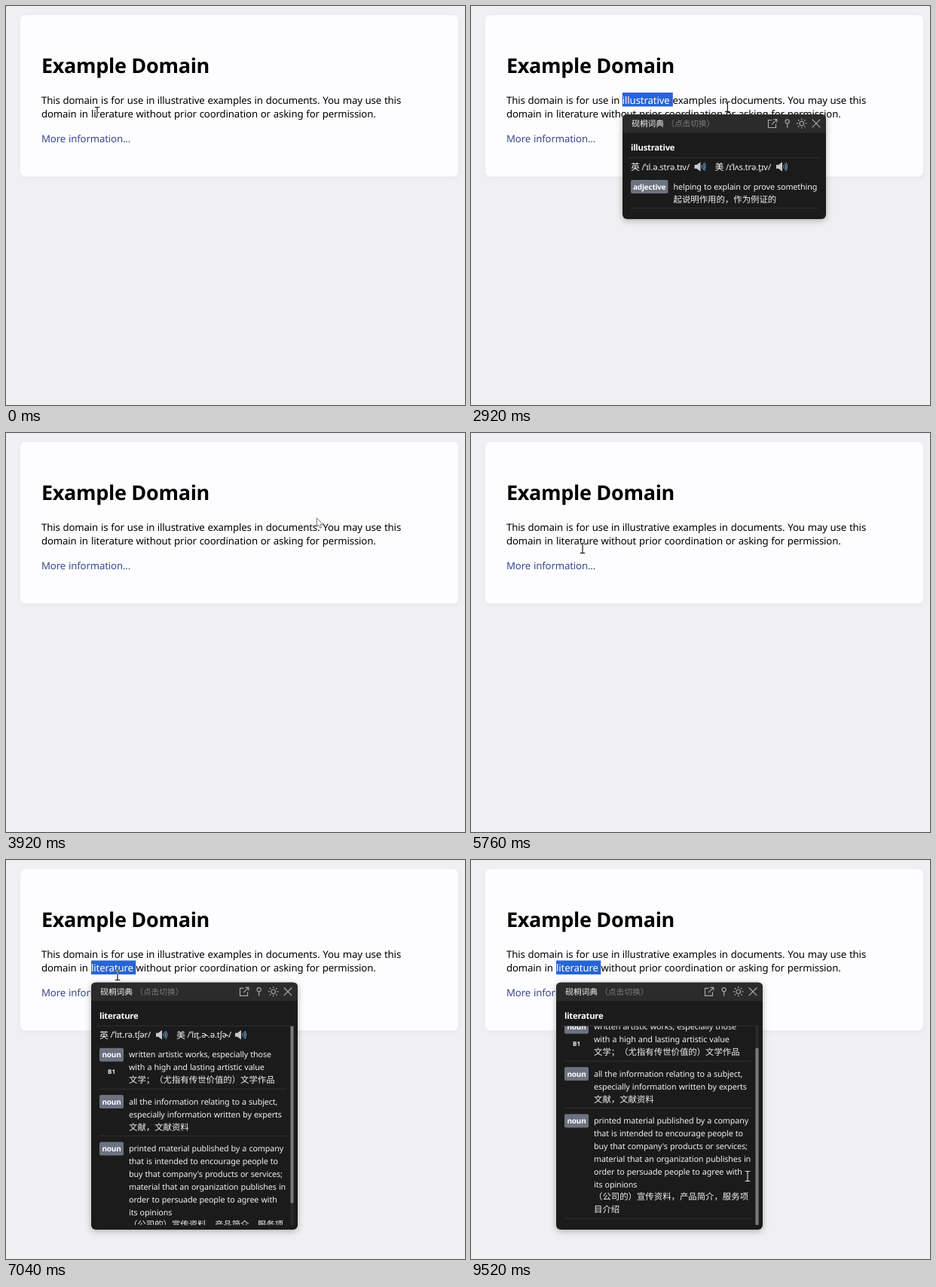
Animation, 609 px wide and 530 px high, one loop 9.56 s. Source, as an HTML page:

```html
<!DOCTYPE html>
<html lang="zh-CN">
<head>
<meta charset="utf-8">
<title>Dictionary popup</title>
<style>
  html, body { margin: 0; width: 100%; height: 100%; overflow: hidden; background: #f0f0f2; }
  svg { display: block; width: 100vw; height: 100vh; }
  text {
    font-family: "Noto Sans", "Noto Sans CJK SC", "Noto Sans CJK", sans-serif;
    text-rendering: geometricPrecision;
    text-spacing-trim: space-all;
    white-space: pre;
  }
  .page text { font-size: 13.2px; letter-spacing: -.01em; word-spacing: .042em; }
  .page .h1 { font-size: 27px; font-weight: 700; letter-spacing: -.0115em; word-spacing: 0; }
  .card { filter: drop-shadow(1px 2px 3px rgba(0, 0, 0, .035)); }
  .popup { filter: drop-shadow(0 2px 4px rgba(0, 0, 0, .28)); }
  .popup text { fill: #f2f2f2; }
  .popup .bar { font-size: 10.7px; font-kerning: none; }
  .popup .dim { fill: #7c7c7c; }
  .popup .word { font-size: 11.3px; font-weight: 700; letter-spacing: -.024em; fill: #fff; }
  .popup .han { font-size: 12px; }
  .popup .ipa { font-size: 11.3px; letter-spacing: -.015em; }
  .popup .en { font-size: 10.77px; letter-spacing: -.0114em; word-spacing: .042em; }
  .popup .zh { font-size: 11.4px; font-weight: 500; font-kerning: none; }
  .popup .tag { font-size: 10px; font-weight: 700; letter-spacing: -.02em; text-anchor: middle; fill: #fff; }
  .popup .level { font-size: 8px; font-weight: 700; text-anchor: middle; }
  .icon { fill: none; stroke: #a8a8a8; stroke-width: 1.2; }
  #beam { fill: none; stroke: #fff; stroke-width: 1.1; mix-blend-mode: difference; }
</style>
</head>
<body>
<svg id="stage" viewBox="0 0 609 530" xmlns="http://www.w3.org/2000/svg">
  <rect width="609" height="530" fill="#f0f0f2"/>
  <rect class="card" x="19" y="12" width="581" height="214.5" rx="7" fill="#fdfdff"/>
  <g class="page">
    <text class="h1" x="47" y="89">Example Domain</text>
    <rect id="mark1" x="200.8" y="115" width="67" height="18.5" fill="#2964d4"/>
    <rect id="mark2" x="113" y="133.5" width="59.3" height="18.5" fill="#2964d4"/>
    <text x="47" y="130">This domain is for use in</text>
    <text id="word1" x="200.8" y="130">illustrative</text>
    <text x="267.6" y="130">examples in documents. You may use this</text>
    <text x="47" y="148.3">domain in</text>
    <text id="word2" x="113" y="148.3">literature</text>
    <text x="172.6" y="148.3">without prior coordination or asking for permission.</text>
    <text x="47" y="181" fill="#38488f">More information...</text>
  </g>
  <g id="popups"></g>
  <path id="beam" d="M-3.3-6.5H-1Q0-6.5 0-5.5Q0-6.5 1-6.5H3.3M0-6V6M-3.3 6.5H-1Q0 6.5 0 5.5Q0 6.5 1 6.5H3.3"/>
  <path id="arrow" d="M0 0V11.8L2.7 9.3L4.5 13.4L6.4 12.6L4.6 8.5H8.3Z" fill="#fff" stroke="#555" stroke-width=".8"/>
</svg>
<script>
const LOOP = 9560, LINE = 16.9, SCROLL = 37;
const VIEW = { top: 58, height: 264 };
const THUMB = 235;
const $ = id => document.getElementById(id);

const text = (cls, x, y, s) => `<text class="${cls}" x="${x}" y="${y}">${s}</text>`;
const rule = (y, x1, x2) => `<path d="M${x1} ${y}H${x2}" stroke="#303030"/>`;
const isHan = s => /[\u4e00-\u9fff]/.test(s);

const speaker = (x, y) => `<g transform="translate(${x} ${y})">
  <path d="M-7-2.5H-4L1-6.2V6.2L-4 2.5H-7Z" fill="#c9c9d0"/>
  <path d="M2.6-2.2Q4 0 2.6 2.2M4.3-4Q6.8 0 4.3 4M6-5.4Q9 0 6 5.4" fill="none" stroke="#6f9fc8" stroke-width="1.1"/></g>`;

function toolbar(w) {
  let rays = "";
  for (let i = 0; i < 8; i++) rays += `<path d="M0-4.7V-6.8" transform="rotate(${i * 45})"/>`;
  const at = (right, body) => `<g transform="translate(${w - right} 12)">${body}</g>`;
  return `<path d="M0 24.5V6Q0 0 6 0H${w - 6}Q${w} 0 ${w} 6V24.5Z" fill="#2b2b2b"/>` +
    text("bar", 12.2, 16, "砚桐词典") + text("bar dim", 58.2, 16, "（点击切换）") +
    `<g class="icon">` +
    at(71, `<path d="M-.5-4.5H-5.5V5.5H4.5V.5M1.5-5.5H5.8V-1.2M5.5-5.2L-1 1.3"/>`) +
    at(51.3, `<circle cy="-2.5" r="2.6"/><path d="M0 .2V5.8"/>`) +
    at(32.3, `<circle r="2.8"/>${rays}`) +
    at(13, `<path d="M-5.3-5.3L5.3 5.3M5.3-5.3L-5.3 5.3"/>`) + `</g>`;
}

function sounds(list, y) {
  return list.map(([han, ipa, x, icon]) =>
    text("han", x, y + 4.5, han) + text("ipa", x + 14.5, y + 4.2, ipa) + speaker(icon, y)).join("");
}

// Stacks the meanings, each with its tag, lines and closing rule.
function meanings(list, tagW, y, right) {
  let out = "";
  for (const { tag, level, lines } of list) {
    out += `<rect x="11" y="${y - 9}" width="${tagW}" height="18" rx="2" fill="#6b7280"/>` +
      text("tag", 11 + tagW / 2, y + 3.7, tag);
    if (level) out += text("level", 11 + tagW / 2, y + 25, level);
    lines.forEach((s, i) => {
      out += text(isHan(s) ? "zh" : "en", 18 + tagW, y + 3.7 + i * LINE, s);
    });
    y += lines.length * LINE;
    out += rule(y - 5.3, 11, right);
    y += 11.6;
  }
  return out;
}

const popup = (id, x, y, w, h, word, body) =>
  `<g id="${id}" class="popup" transform="translate(${x} ${y})">
    <rect width="${w}" height="${h}" rx="6" fill="#1b1b1b"/>${toolbar(w)}
    ${text("word", 11, 48.2, word)}${rule(57.5, 7, w - 6)}${body}</g>`;

const small = sounds([
  ["英", "/ˈɪl.ə.strə.tɪv/", 11, 102.5],
  ["美", "/ɪˈlʌs.trə.t̬ɪv/", 122.5, 211]
], 69.5) + meanings([
  { tag: "adjective", lines: ["helping to explain or prove something", "起说明作用的，作为例证的"] }
], 49.5, 96, 260);

const large = sounds([
  ["英", "/ˈlɪt.rə.tʃər/", 11, 93],
  ["美", "/ˈlɪt̬.ɚ.ə.tʃɚ/", 113, 198]
], 69.5) + meanings([
  { tag: "noun", level: "B1", lines: ["written artistic works, especially those",
    "with a high and lasting artistic value", "文学；（尤指有传世价值的）文学作品"] },
  { tag: "noun", lines: ["all the information relating to a subject,",
    "especially information written by experts", "文献，文献资料"] },
  { tag: "noun", lines: ["printed material published by a company",
    "that is intended to encourage people to", "buy that company's products or services;",
    "material that an organization publishes in", "order to persuade people to agree with",
    "its opinions", "（公司的）宣传资料，产品简介，服务项", "目介绍"] }
], 32, 96, 259);

$("popups").innerHTML =
  `<clipPath id="view"><rect y="${VIEW.top}" width="274" height="${VIEW.height}"/></clipPath>` +
  popup("pop1", 201, 144, 270, 139, "illustrative", small) +
  popup("pop2", 113, 162.8, 274, 328.2, "literature",
    `<g clip-path="url(#view)"><g id="list">${large}</g></g>
     <rect x="264.5" y="${VIEW.top}" width="4" height="${VIEW.height}" fill="#2a2a2a"/>
     <rect id="thumb" x="264.5" width="4" height="${THUMB}" rx="1" fill="#7b7b7b"/>`);

// Pointer moves: start, end, from, control, to, quick start.
const MOVES = [
  [40, 680, 121, 141, 180, 142, 229, 128],
  [2240, 2560, 229, 128, 235, 150, 254, 147],
  [2760, 3280, 254, 147, 316, 156, 385, 109, true],
  [3640, 4560, 385, 109, 451, 116, 475.5, 139.5],
  [4920, 5760, 475.5, 139.5, 300, 165, 148, 153],
  [7440, 8200, 148, 153, 190, 260, 273, 316],
  [8960, 9520, 273, 316, 330, 470, 367, 420]
];

const ramp = (t, a, b) => Math.min(1, Math.max(0, (t - a) / (b - a)));
const smooth = u => u * u * (3 - 2 * u);
const bezier = (a, b, c, u) => (1 - u) * (1 - u) * a + 2 * u * (1 - u) * b + u * u * c;
const scrolled = t => smooth(ramp(t, 8156, 8390));

function pointer(t) {
  const move = MOVES.filter(m => t >= m[0]).pop() || MOVES[0];
  const [a, b, x0, y0, cx, cy, x1, y1, quick] = move;
  const k = ramp(t, a, b), u = quick ? 1 - (1 - k) ** 3 : smooth(k);
  return [bezier(x0, cx, x1, u), bezier(y0, cy, y1, u)];
}

function show(id, alpha) {
  $(id).style.display = alpha > 0 ? "" : "none";
  $(id).style.opacity = alpha;
}

function select(n, on) {
  show("mark" + n, on ? 1 : 0);
  $("word" + n).setAttribute("fill", on ? "#fff" : "#000");
}

function draw(t) {
  const a1 = ramp(t, 1240, 1440) - ramp(t, 3640, 3800);
  const a2 = ramp(t, 6640, 6840);
  select(1, t >= 1120 && t < 3640);
  select(2, t >= 6360);
  show("pop1", a1);
  show("pop2", a2);

  // The scrollbar trails the content a little.
  $("list").setAttribute("transform", `translate(0 ${-SCROLL * scrolled(t)})`);
  $("thumb").setAttribute("y", VIEW.top + (VIEW.height - THUMB) * scrolled(t - 80));

  const [x, y] = pointer(t);
  const inBar = (a, px, py, w) => a > 0 && x > px && x < px + w && y > py && y < py + 24.5;
  const arrow = y < 115 || inBar(a1, 201, 144, 270) || inBar(a2, 113, 162.8, 274);
  show("arrow", arrow ? 1 : 0);
  show("beam", arrow ? 0 : 1);
  $(arrow ? "arrow" : "beam").setAttribute("transform", `translate(${x} ${y})`);
}

const start = performance.now();
function tick() {
  draw((performance.now() - start) % LOOP);
  requestAnimationFrame(tick);
}
tick();
</script>
</body>
</html>
```
